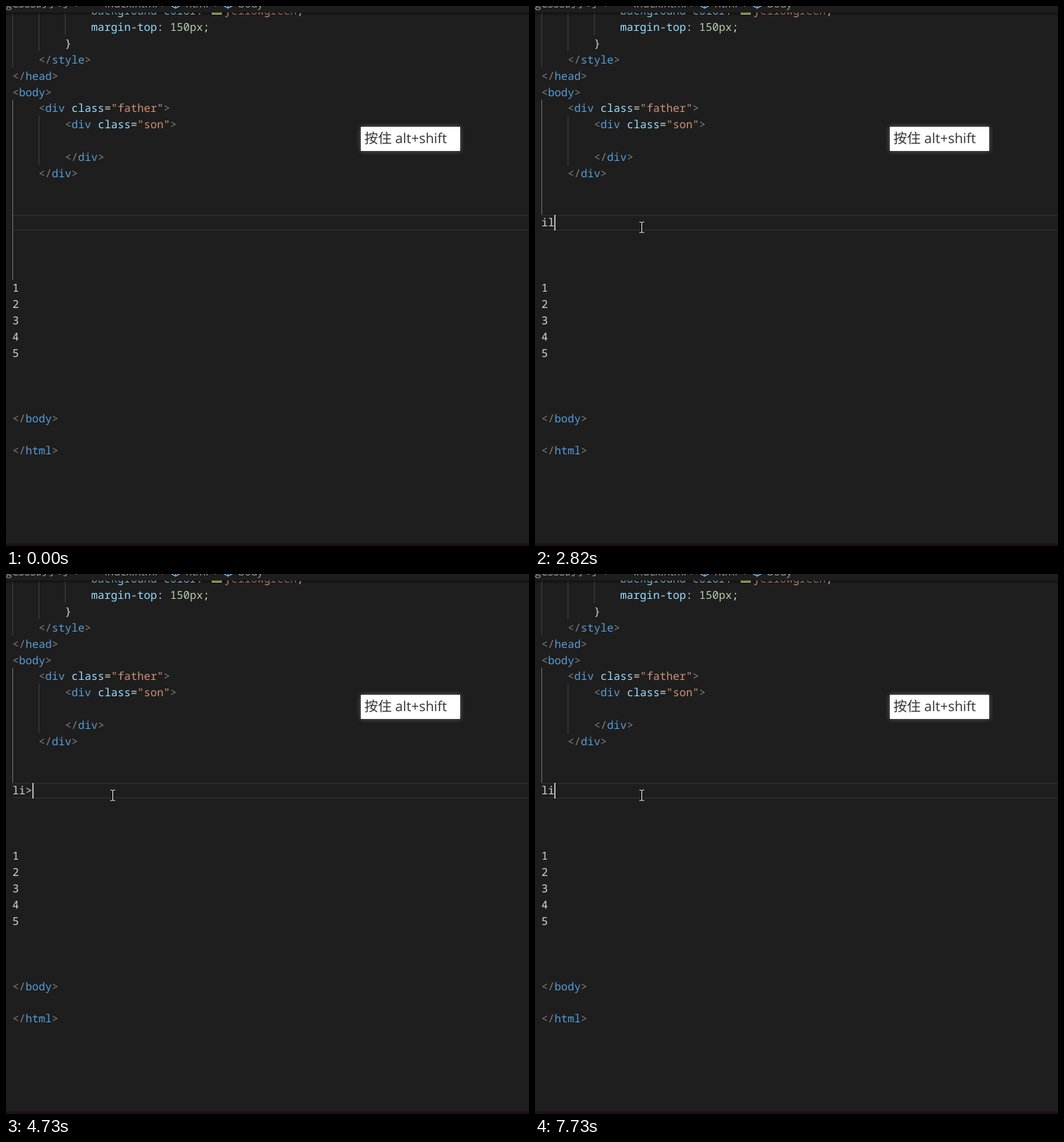
Animation of 737 by 760 pixels, one loop 8000 ms. Source, as an HTML page:

```html
<!DOCTYPE html>
<html lang="zh">
<head>
<meta charset="utf-8">
<style>
html, body { margin: 0; width: 100%; height: 100%; overflow: hidden; background: #1e1e1e; }
svg { display: block; }
text { white-space: pre; font: 500 15.43px "Noto Sans Mono", monospace; text-rendering: geometricPrecision; }
.crumb { font: 15px "Open Sans", "Noto Sans CJK SC", sans-serif; fill: #a0a0a0; }
.note { font: 19.3px "Open Sans", "Noto Sans CJK SC", sans-serif; fill: #333; }
.glow { filter: drop-shadow(0 0 3px rgba(255, 255, 255, .35)); }
.hit { font-weight: bold; }
</style>
</head>
<body>
<svg width="737" height="760" viewBox="0 0 737 760">
  <defs>
    <linearGradient id="shade" x2="0" y2="1">
      <stop stop-color="#000" stop-opacity=".45"/>
      <stop offset="1" stop-color="#000" stop-opacity="0"/>
    </linearGradient>
    <path id="wrench" transform="scale(1.15)" fill="none" stroke="#d4d4d4" stroke-width="1.2"
      d="M14.4 4.2L11.8 6.4L9.6 6L9.4 4L11.7 1.6A4 4 0 0 0 6.8 6.6L1.8 11.6A1.9 1.9 0 0 0 4.4 14.2L9.4 9.2A4 4 0 0 0 14.4 4.2Z"/>
    <path id="cube" fill="none" stroke="#75beff" stroke-width="1.3" d="M-5.5 -6L0 -9L5.5 -6V0L0 3L-5.5 0ZM-5.5 -6L0 -3L5.5 -6M0 -3V3"/>
    <path id="beam" fill="none" d="M-3.5 -7.5H-1.5L0 -6.5L1.5 -7.5H3.5M0 -6.5V6.5M-3.5 7.5H-1.5L0 6.5L1.5 7.5H3.5"/>
  </defs>
  <g id="page"></g>
  <g id="live"></g>
  <g id="mouse">
    <use href="#beam" stroke="#000" stroke-width="2.4"/>
    <use href="#beam" stroke="#eee" stroke-width="1.1"/>
  </g>
</svg>
<script>
const $ = id => document.getElementById(id);
const CHAR = 9.26, ROW = 22.95, LOOP = 8000;
const PLAIN = '#d4d4d4', PROP = '#9cdcfe', STR = '#ce9178', TAG = '#569cd6', GREY = '#808080', HIT = '#18a3ff';

const esc = s => s.replace(/&/g, '&amp;').replace(/</g, '&lt;');
const text = (x, y, s, fill, cls = '') => `<text x="${x}" y="${y}" fill="${fill}" class="${cls}">${esc(s)}</text>`;
const rect = (x, y, w, h, fill, more = '') => `<rect x="${x}" y="${y}" width="${w}" height="${h}" fill="${fill}" ${more}/>`;
const put = (col, row, s, fill = PLAIN) => text(9 + col * CHAR, Math.round(34.7 + row * ROW), s, fill);

// Colours one line of markup, token by token.
function markup(col, row, line) {
  const kinds = [GREY, STR, PROP, TAG, PLAIN];
  return [...line.matchAll(/(<\/?|>)|(".*?")|(class)|(\w+)|(=)/g)]
    .map(m => put(col + m.index, row, m[0], kinds[m.slice(1).findIndex(Boolean)])).join('');
}

function page() {
  const lines = [
    [4, 2, '</style>'], [0, 3, '</head>'], [0, 4, '<body>'], [4, 5, '<div class="father">'],
    [8, 6, '<div class="son">'], [8, 8, '</div>'], [4, 9, '</div>'], [0, 24, '</body>'], [0, 26, '</html>']
  ];
  const guides = [[9, 9, 87], [46, 9, 64], [83, 9, 41], [46, 155, 224]];
  const crumbs = [[0, 'gCSSS的学习'], [98, '›'], [139, 'index.html'], [219, '›'], [253, 'html'], [294, '›'], [327, 'body']];
  return guides.map(([x, a, b]) => rect(x, a, 1, b - a, '#404040')).join('')
    + put(12, -1, 'background-color', PROP) + put(28, -1, ':')
    + rect(290, 0, 14, 12, '#eee') + rect(291, 0, 12, 11, '#9acd32')
    + text(308, 12, 'yellowgreen', STR) + text(410, 12, ';', PLAIN)
    + put(12, 0, 'margin-top', PROP) + put(22, 0, ':') + put(24, 0, '150px', '#b5cea8') + put(29, 0, ';')
    + put(8, 1, '}')
    + lines.map(l => markup(...l)).join('')
    + [1, 2, 3, 4, 5].map(n => put(0, 15 + n, String(n))).join('')
    + rect(10, 294, 726, 1.5, '#2c2c2c') + rect(10, 314.5, 726, 1.5, '#2c2c2c')
    + rect(0, 0, 737, 9, '#1e1e1e')
    + crumbs.map(([x, s]) => text(x, 2, s, '', 'crumb')).join('')
    + '<use href="#cube" x="239"/><use href="#cube" x="313"/>'
    + rect(0, 9, 737, 5, 'url(#shade)')
    + rect(0, 756, 737, 4, '#1b1118')
    + rect(500, 170, 140, 34, '#fff', 'class="glow"')
    + text(505, 193, '按住 alt+shift', '', 'note');
}

const menus = {
  i: 'i iframe img img:s img:sizes img:srcset img:z inp input input:b input:button input:c',
  l: 'l label leg legend li link link:atom link:css link:favicon link:im link:import link:manifest',
  li: 'li link link:atom link:css link:favicon link:im link:import link:manifest link:mf link:print link:rss link:touch',
  'li>a': 'li>a a:blank a:link a:mail a:tel acr adr area:c area:d area:p area:r art'
};

function popup(typed, x) {
  const word = typed.split('>').pop();
  const rows = menus[typed].split(' ').map((name, i) => {
    const y = Math.round(334.6 + i * 22.92), n = i ? word.length : typed.length;
    return `<use href="#wrench" x="0" y="0" transform="translate(${x + 4} ${y - 15.5})"/>`
      + text(x + 28, y, name.slice(0, n), HIT, 'hit')
      + text(x + 28 + n * CHAR, y, name.slice(n), PLAIN);
  });
  return rect(x + .5, 316.5, 521, 280, '#252526', 'stroke="#454545"')
    + rect(x + 1, 318, 520, 22, '#094771')
    + rows.join('') + text(x + 341, 335, 'Emmet Abbreviation', '#c4ccd2')
    + (typed === 'li' ? '' : rect(x + 508, 318, 13, 258, '#797979', 'fill-opacity=".5"'));
}

// time, typed text, caret shown, popup shown
const states = [
  [0, '', 0, 0], [1390, '', 1, 0], [1970, '', 0, 0], [2430, '', 1, 0],
  [2760, 'i', 1, 1], [2820, 'il', 1, 0], [3220, 'i', 1, 0], [3350, '', 1, 0],
  [3750, 'l', 1, 0], [3840, 'l', 1, 1], [3930, 'li', 1, 0], [4010, 'li', 1, 1], [4530, 'li', 0, 1],
  [4730, 'li>', 1, 0], [5060, 'li>a', 1, 0], [5130, 'li>a', 1, 1], [5530, 'li>a', 0, 1],
  [6070, 'li>a', 1, 1], [6530, 'li>a', 0, 1], [7060, 'li>a', 1, 1], [7530, 'li>a', 0, 1],
  [7630, 'li>', 1, 0], [7730, 'li', 1, 0]
];

// Pointer moves: start, end, steps, from x y, to x y
const moves = [
  [130, 580, 7, 714, 752, 150, 331],
  [780, 910, 3, 105, 325, 13, 312],
  [1240, 1560, 5, 20, 313, 154, 331],
  [1630, 1700, 2, 152, 320, 149, 311],
  [1900, 1900, 1, 150, 311, 150, 311]
];

function pointer(t) {
  const m = moves.findLast(m => m[0] <= t);
  if (!m) return null;
  const [a, b, n, x0, y0, x1, y1] = m;
  const p = n < 2 ? 1 : Math.min(1, Math.floor((t - a) / (b - a) * (n - 1) + 1e-6) / (n - 1));
  const e = 1 - (1 - p) ** 1.6;
  return [x0 + (x1 - x0) * e, y0 + (y1 - y0) * e].map(Math.round);
}

function live([, typed, caret, menu]) {
  const x = Math.round(8.9 + typed.length * CHAR);
  return rect(9, 132, 1, typed ? 162 : 254, '#707070')
    + put(0, 12, typed)
    + (menu ? popup(typed, x) : '')
    + (caret ? rect(x, 294, 2, 22, '#aeafad') : '');
}

let shown;
function draw() {
  const t = performance.now() % LOOP;
  const state = states.findLast(s => s[0] <= t);
  if (state !== shown) $('live').innerHTML = live(shown = state);
  const at = pointer(t);
  $('mouse').style.display = at ? '' : 'none';
  if (at) $('mouse').setAttribute('transform', `translate(${at[0] + .5} ${at[1] + .5})`);
  requestAnimationFrame(draw);
}

$('page').innerHTML = page();
draw();
</script>
</body>
</html>
```
